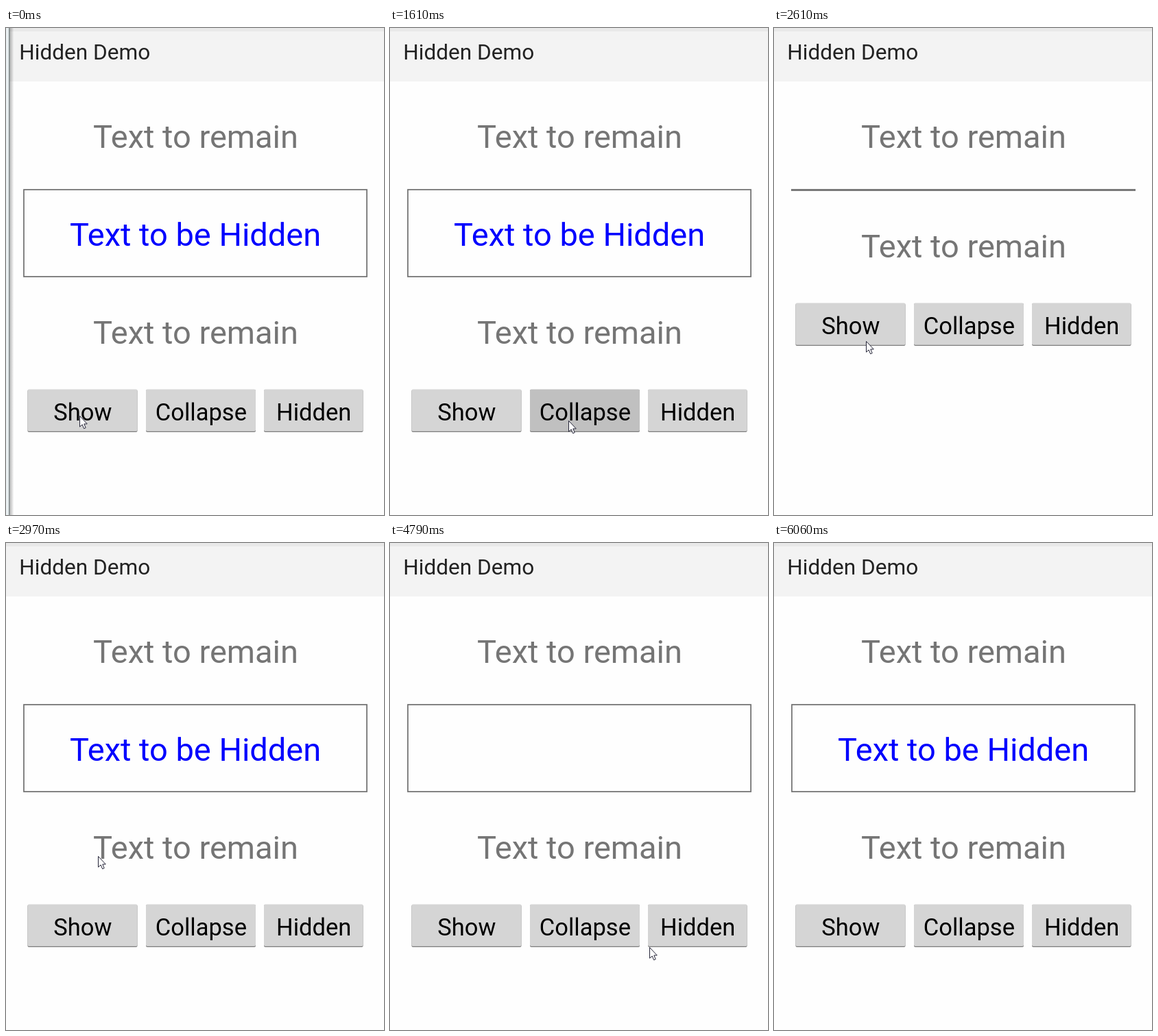
These frames come from a looping animation (551x711 px, 7.08 s). An HTML page:

```html
<!DOCTYPE html>
<html lang="en">
<head>
<meta charset="utf-8">
<title>Hidden Demo</title>
<style>
  html, body { margin: 0; width: 100%; height: 100%; overflow: hidden; background: #fefefe; }
  svg { display: block; width: 551px; height: 711px; }
  text { font-family: Roboto, sans-serif; white-space: pre; }
  .title { font-size: 31.6px; fill: #222; }
  .label { font-size: 47px; fill: #757575; }
  .secret { fill: #0000fe; }
  .button text { font-size: 34.5px; text-anchor: middle; fill: #000; }
  .face { fill: #d5d5d5; }
  .pressed .face { fill: #c0c0c0; }
</style>
</head>
<body>
<svg viewBox="0 0 551 711">
  <defs>
    <linearGradient id="shade">
      <stop offset="0" stop-color="#000" stop-opacity=".28"/>
      <stop offset="1" stop-color="#000" stop-opacity="0"/>
    </linearGradient>
  </defs>
  <rect width="551" height="711" fill="#fefefe"/>
  <rect width="551" height="78" fill="#f3f3f3"/>
  <rect width="551" height="5" fill="#e9e9e9"/>
  <text class="title" x="19.2" y="46">Hidden Demo</text>
  <g id="edge">
    <rect width="4" height="711" fill="#e8eef0"/>
    <rect x="4" width="1.5" height="711" fill="#7c8587"/>
    <rect x="5.5" width="6" height="711" fill="url(#shade)"/>
  </g>
  <text class="label" x="127" y="175">Text to remain</text>
  <rect id="frame" x="26" y="236" width="500" height="127" fill="none" stroke="#6e6e6e" stroke-width="1.7"/>
  <rect id="line" x="25" y="235" width="502" height="3" fill="#797979"/>
  <text id="secret" class="label secret" x="93" y="318">Text to be Hidden</text>
  <g id="lower">
    <text class="label" x="127" y="461">Text to remain</text>
    <g id="buttons"></g>
  </g>
  <path id="cursor" d="M.5 .5V16.2L4.2 13L6.6 18.8L9.2 17.7L6.8 12H11.3Z" fill="#fff" stroke="#252538"/>
</svg>
<script>
const LOOP = 7080;
const STEP = 88; // ms between cursor positions
const NS = "http://www.w3.org/2000/svg";
const byId = id => document.getElementById(id);

function add(parent, tag, attrs, content = "") {
  const node = document.createElementNS(NS, tag);
  for (const key in attrs) node.setAttribute(key, attrs[key]);
  node.textContent = content;
  return parent.appendChild(node);
}

function makeButton(name, x, width, result) {
  const group = add(byId("buttons"), "g", { class: "button" });
  add(group, "rect", { x, y: 528, width, height: 62, rx: 2, fill: "#7d7d7d" });
  add(group, "rect", { x, y: 527.6, width, height: 61.2, rx: 2, class: "face" });
  add(group, "text", { x: x + width / 2 + 0.4, y: 573 }, name);
  return { group, result };
}

const show = makeButton("Show", 31.5, 160, "visible");
const collapse = makeButton("Collapse", 204, 160, "collapsed");
const hide = makeButton("Hidden", 376, 144.5, "hidden");

// A button takes effect when it is released.
const taps = [
  { button: show, press: 460, release: 710 },
  { button: collapse, press: 1610, release: 1700 },
  { button: show, press: 2890, release: 2970 },
  { button: hide, press: 4060, release: 4250 },
  { button: show, press: 5420, release: 5620 }
];

// The cursor travels along quadratic curves, bent towards "via".
const home = { x: 107, y: 566 };
const moves = [
  { start: 970, steps: 5, via: { x: 184, y: 554 }, to: { x: 260, y: 573 } },
  { start: 2170, steps: 6, via: { x: 200, y: 508 }, to: { x: 134, y: 457 } },
  { start: 3340, steps: 7, via: { x: 290, y: 620 }, to: { x: 428, y: 553 } },
  { start: 4700, steps: 8, via: { x: 258, y: 703 }, to: { x: 88, y: 553 } },
  { start: 5880, steps: 2, via: { x: 130, y: 589 }, to: { x: 171, y: 625 } }
];
const CURSOR_GONE = 6060;

const ease = p => (1 - Math.cos(Math.PI * p)) / 2;
const curve = (a, b, c, p) => (1 - p) ** 2 * a + 2 * p * (1 - p) * b + p * p * c;

function cursorAt(time) {
  let from = home;
  for (const { start, steps, via, to } of moves) {
    if (time < start) break;
    const step = Math.min(steps, Math.floor((time - start) / STEP + 0.001) + 1);
    const p = ease(step / steps);
    if (step < steps) return { x: curve(from.x, via.x, to.x, p), y: curve(from.y, via.y, to.y, p) };
    from = to;
  }
  return from;
}

const display = (id, on) => byId(id).style.display = on ? "" : "none";

function draw(time) {
  const box = taps.findLast(tap => tap.release <= time)?.button.result ?? "visible";
  const pressed = taps.find(tap => tap.press <= time && time < tap.release)?.button;
  const collapsed = box === "collapsed";
  const { x, y } = cursorAt(time);
  display("edge", time < taps[0].press);
  display("frame", !collapsed);
  display("line", collapsed);
  display("secret", box === "visible");
  display("cursor", time < CURSOR_GONE);
  byId("lower").setAttribute("transform", `translate(0 ${collapsed ? -126 : 0})`);
  byId("cursor").setAttribute("transform", `translate(${Math.round(x)} ${Math.round(y)})`);
  for (const button of [show, collapse, hide]) {
    button.group.classList.toggle("pressed", button === pressed);
  }
}

const start = performance.now();
function tick() {
  draw((performance.now() - start) % LOOP);
  requestAnimationFrame(tick);
}
tick();
</script>
</body>
</html>
```
